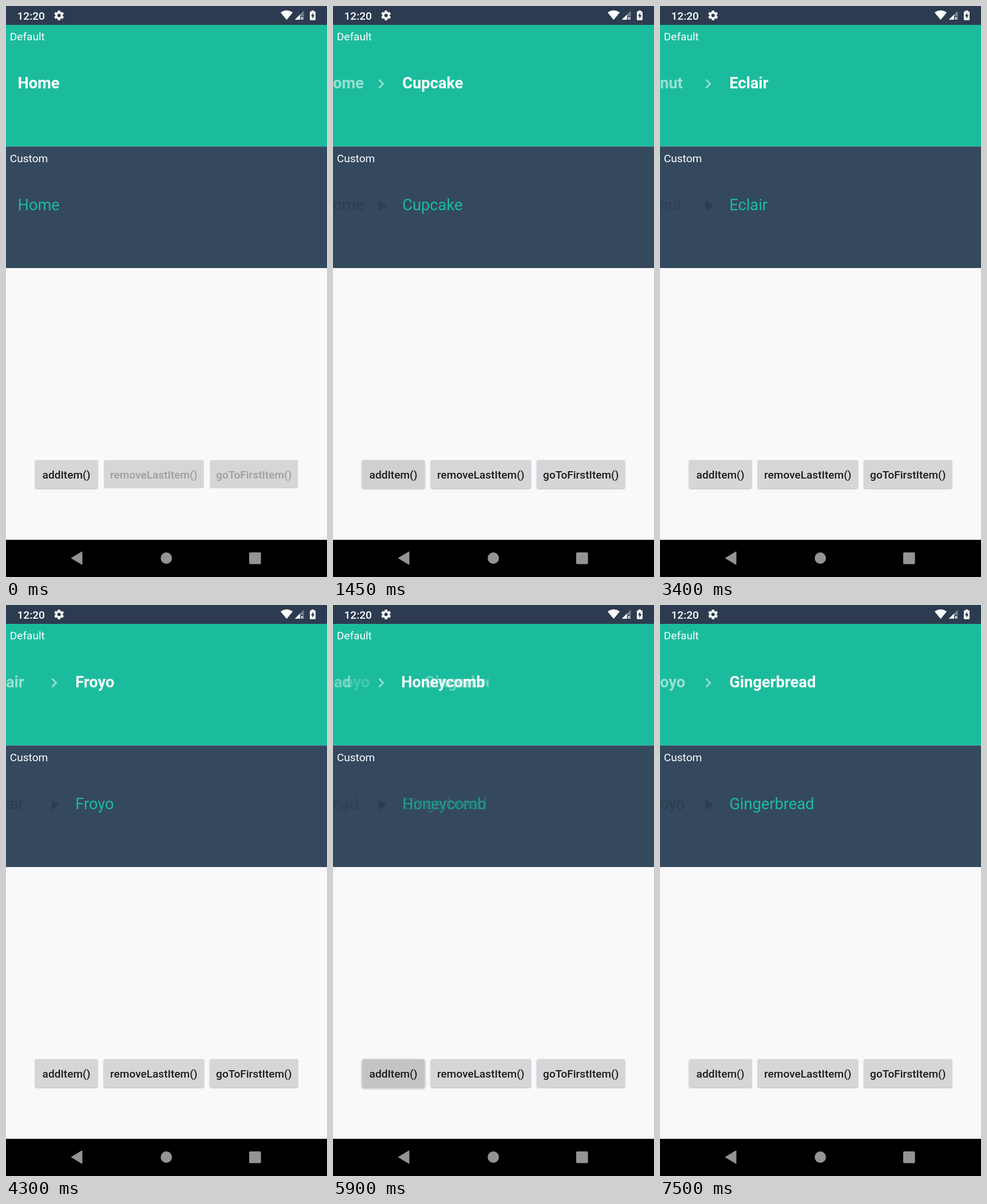
These frames come from a looping animation (561x998 px, 8000 ms). An HTML page:

```html
<!DOCTYPE html>
<html lang="en">
<head>
<meta charset="utf-8">
<title>Breadcrumbs</title>
<style>
  html, body { margin: 0; width: 100%; height: 100%; overflow: hidden; background: #faf8fb; }
  svg { display: block; }
  text { font-family: Roboto, sans-serif; font-size: 19.09px; white-space: pre; }
  .medium { font-weight: 500; }
  .crumb text { font-size: 27.27px; }
  .default { fill: #fff; font-weight: 700; }
  .default .prev, .default .sep { fill-opacity: .55; }
  .custom { fill: #1abc9c; }
  .custom .prev, .custom .sep { fill: #2c3e50; }
</style>
</head>
<body>
<svg id="stage" width="561" height="998" viewBox="0 0 561 998">
  <rect width="561" height="998" fill="#faf8fb"/>
  <rect width="561" height="33" fill="#2c3b50"/>
  <rect y="33" width="561" height="212.5" fill="#1bbc9d"/>
  <rect y="245.5" width="561" height="212.5" fill="#34495e"/>

  <g fill="#fff">
    <text class="medium" x="19.5" y="23.7">12:20</text>
    <g transform="translate(92.7 16.5)">
      <circle r="6.4"/>
      <rect id="tooth" x="-2.3" y="-8.5" width="4.6" height="17" rx=".6"/>
      <use href="#tooth" transform="rotate(60)"/>
      <use href="#tooth" transform="rotate(120)"/>
      <circle r="3" fill="#2c3b50"/>
    </g>
    <path d="M490.5 24.3L479.8 11.2Q490.5 4 501.2 11.2Z"/>
    <path d="M520.5 8.3V24H504.8Z" opacity=".35"/>
    <path d="M504.8 24L513.8 15V24Z"/>
    <rect x="514" y="18" width="7" height="7" fill="#2c3b50"/>
    <path d="M515.2 19.2l4.6 4.6m0-4.6l-4.6 4.6" stroke="#fff" stroke-width="1.3"/>
    <path d="M534 7.8h4v1.7h1.9q1.1 0 1.1 1.1v13.1q0 1.1-1.1 1.1h-7.8q-1.1 0-1.1-1.1v-13.1q0-1.1 1.1-1.1h1.9z"/>
    <path d="M537 11.5l-4 6.4h2.4v4.6l4-6.6h-2.4z" fill="#2c3b50"/>
    <text x="6.8" y="60.2">Default</text>
    <text x="6.8" y="272.8">Custom</text>
  </g>

  <g id="rows"></g>
  <g id="buttons"></g>

  <rect y="933" width="561" height="65" fill="#000"/>
  <g fill="#949396">
    <path d="M114.5 965L132.8 954.2V975.8Z" stroke="#949396" stroke-width="1.4" stroke-linejoin="round"/>
    <circle cx="280.2" cy="965" r="9.9"/>
    <rect x="425" y="955" width="20.6" height="20.6" rx="1.8"/>
  </g>
</svg>
<script>
const NS = 'http://www.w3.org/2000/svg';
const LOOP = 8000, STEP = 50, SLIDE = 300;
const ROOT_X = 20.45, CUR_X = 121.2;

// Each tap: time, button index, resulting path, delay of the text switch
const taps = [
  { at: 1150, btn: 0, prev: 'Home', cur: 'Cupcake' },
  { at: 2000, btn: 0, prev: 'Cupcake', cur: 'Donut' },
  { at: 3050, btn: 0, prev: 'Donut', cur: 'Eclair' },
  { at: 3950, btn: 0, prev: 'Eclair', cur: 'Froyo' },
  { at: 4800, btn: 0, prev: 'Froyo', cur: 'Gingerbread' },
  { at: 5700, btn: 0, prev: 'Gingerbread', cur: 'Honeycomb' },
  { at: 7100, btn: 1, prev: 'Froyo', cur: 'Gingerbread', delay: 50 }
];
const home = { at: -1000, btn: -1, prev: '', cur: 'Home' };

function el(parent, name, attrs = {}) {
  const node = document.createElementNS(NS, name);
  set(node, attrs);
  return parent.appendChild(node);
}

function set(node, attrs) {
  for (const key in attrs) node.setAttribute(key, attrs[key]);
}

function clipRect(id, attrs) {
  return el(el(stage, 'clipPath', { id }), 'rect', attrs);
}

function makeRow(kind, y, sepPath) {
  const group = el(rows, 'g', { class: 'crumb ' + kind });
  const clip = clipRect('clip-' + kind, { x: 101, y: y - 40, height: 60 });
  const word = (parent, cls) => el(parent, 'text', { class: cls, y });
  const row = { slide: kind === 'default', clip, group };
  row.prevOut = word(group, 'prev');
  row.prevIn = word(group, 'prev');
  row.sep = el(group, 'path', { class: 'sep', d: sepPath });
  const box = el(group, 'g');
  row.box = box;
  row.curOut = word(box, 'cur');
  row.curIn = word(box, 'cur');
  return row;
}

function makeButton(label, x, width, touch, i) {
  const shape = { x, y: 793.8, width, height: 49.2, rx: 2.4 };
  clipRect('clip-btn' + i, shape);
  const face = el(buttons, 'rect', { ...shape, fill: '#d5d6d8' });
  const ripple = el(buttons, 'circle', { cy: 818.4, 'clip-path': `url(#clip-btn${i})` });
  const text = el(buttons, 'text', { class: 'medium', x: x + width / 2, y: 825.6, 'text-anchor': 'middle' });
  text.textContent = label;
  return { face, ripple, text, touch, mid: x + width / 2, reach: Math.hypot(width, 49) / 2 };
}

const crumbs = [
  makeRow('default', 143.8, 'M81.4 127.8l-1.9 1.9 6.2 6.3-6.2 6.3 1.9 1.9 8.2-8.2z'),
  makeRow('custom', 356.6, 'M79.2 339.8V358.6L94 349.2Z')
];
const keys = [
  makeButton('addItem()', 50.8, 109.4, 127, 0),
  makeButton('removeLastItem()', 170.8, 175, 266, 1),
  makeButton('goToFirstItem()', 356.4, 153.8, 433, 2)
];

function put(node, str, x, opacity) {
  if (node.textContent !== str) node.textContent = str;
  set(node, { x, opacity });
}

function drawRow(row, from, to, f) {
  const ease = 1 - (1 - f) ** 3;
  const k = row.slide ? 1 : 0;
  const atRoot = to === home || (from === home && f === 0);
  const x = atRoot ? ROOT_X : CUR_X;
  put(row.prevOut, from.prev.slice(-3), k * 30 * f, 1 - f);
  put(row.prevIn, to.prev.slice(-3), -k * 40 * (1 - f), f);
  put(row.curOut, from.cur, x + k * 58 * f, 1 - f);
  put(row.curIn, to.cur, x - k * 52 * (1 - ease), k ? ease : f);
  set(row.sep, { opacity: atRoot ? 0 : 1 });
  const width = Math.max(row.curOut.getComputedTextLength(), row.curIn.getComputedTextLength());
  set(row.clip, { width: CUR_X - 101 + width });
  if (f > 0 && f < 1) set(row.box, { 'clip-path': `url(#${row.clip.parentNode.id})` });
  else row.box.removeAttribute('clip-path');
}

function drawButton(key, age, span, enabled) {
  const pressed = age >= 0 && age < span;
  const grow = Math.min(1, .63 + age / 130);
  const fade = Math.max(0, (span - age) / (span - 100));
  const shade = !pressed ? 0 : age < 100 ? .07 + age * .0007 : .14 * fade;
  const lift = pressed ? shade / .14 : 0;
  const cx = grow < 1 ? key.touch : key.mid;
  set(key.ripple, { cx, r: key.reach * grow, opacity: shade });
  set(key.text, { fill: enabled ? '#1c1c1d' : '#9d9ea0' });
  key.face.style.filter = enabled
    ? `drop-shadow(0 ${1.3 + 1.7 * lift}px ${1.1 + 1.3 * lift}px rgba(0,0,0,.3))`
    : 'none';
}

function draw(time) {
  const t = Math.floor((time % LOOP) / STEP) * STEP;
  const i = taps.filter(tap => tap.at <= t).length - 1;
  const tap = i < 0 ? home : taps[i];
  const from = i > 0 ? taps[i - 1] : home;
  const age = t - tap.at;
  const delay = tap.delay || 0;
  const f = i < 0 ? 1 : Math.min(1, Math.max(0, (age - delay) / SLIDE));
  for (const row of crumbs) drawRow(row, from, tap, f);
  const deep = i > 0 || (i === 0 && f > 0);
  keys.forEach((key, n) => drawButton(key, n === tap.btn ? age : -1, 350 + delay, n === 0 || deep));
}

const start = performance.now();
function tick() {
  draw(performance.now() - start);
  requestAnimationFrame(tick);
}
tick();
</script>
</body>
</html>
```
